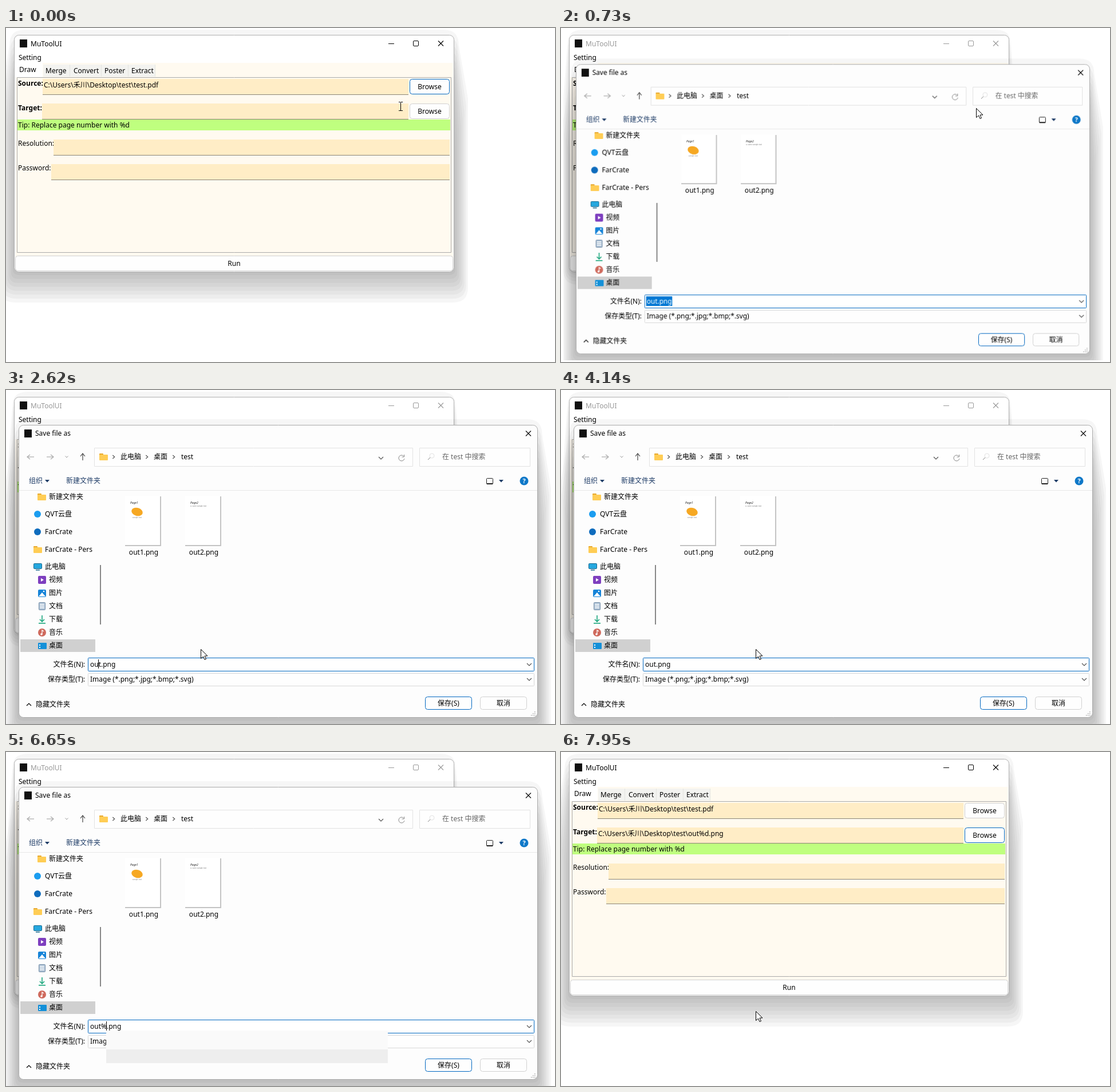
Recreate the animation shown at these times as an HTML page with a canvas. Size 959x584 px, loop 8000 ms.

```html
<!DOCTYPE html>
<html lang="zh-CN">
<head>
<meta charset="utf-8">
<style>
html, body { margin: 0; width: 100%; height: 100%; overflow: hidden; background: #fff; }
canvas { display: block; }
</style>
</head>
<body>
<canvas id="stage" width="959" height="584"></canvas>
<script>
const W = 959, H = 584, LOOP = 8000;
const stage = document.getElementById('stage').getContext('2d');
const layer = document.createElement('canvas');
layer.width = W;
layer.height = H;
const dialogCtx = layer.getContext('2d');
let g = stage;

const BLUE = '#0067c0', CREAM = '#fffaf0', FIELD = '#ffedc6';
const FAMILY = '"Noto Sans", "Noto Sans CJK SC", "Noto Sans CJK", sans-serif';
const clamp = v => Math.max(0, Math.min(1, v));

function text(s, x, y, color = '#000', align = 'left', style = '12px') {
  g.font = `${style} ${FAMILY}`;
  g.textAlign = align;
  g.fillStyle = color;
  g.fillText(s, x, y);
}
function box(x, y, w, h, fill, stroke, r = 0) {
  g.beginPath();
  const o = stroke ? .5 : 0;
  g.roundRect(x + o, y + o, w - 2 * o, h - 2 * o, r);
  if (fill) { g.fillStyle = fill; g.fill(); }
  if (stroke) { g.strokeStyle = stroke; g.lineWidth = 1; g.stroke(); }
}
function disc(x, y, r, fill) {
  g.beginPath();
  g.arc(x, y, r, 0, 7);
  g.fillStyle = fill;
  g.fill();
}
function path(points, stroke, fill, width = 1) {
  g.beginPath();
  for (let i = 0; i < points.length; i += 2) g.lineTo(points[i], points[i + 1]);
  if (fill) { g.closePath(); g.fillStyle = fill; g.fill(); }
  if (stroke) { g.strokeStyle = stroke; g.lineWidth = width; g.stroke(); }
}
const chevron = (x, y, dx, dy, color = '#555') =>
  path(dx ? [x - dx, y - 3, x + dx, y, x - dx, y + 3] : [x - 4, y - dy, x, y + dy, x + 4, y - dy], color, null, 1.2);
const triangle = (x, y, color) => path([x - 4, y - 2, x + 4, y - 2, x, y + 2.5], null, color);
function cross(x, y, color) {
  path([x - 4.5, y - 4.5, x + 4.5, y + 4.5], color, null, 1.1);
  path([x + 4.5, y - 4.5, x - 4.5, y + 4.5], color, null, 1.1);
}

// Stacked translucent bands; the inner ones start lower, so the top stays light
function shadow(x, y, w, h, spread, drop, bands) {
  g.fillStyle = 'rgba(0,0,0,.036)';
  for (let i = 0; i < bands; i++) {
    const k = 1 - i / bands;
    const l = x - spread * k, r = x + w + spread * k;
    const t = y - 10 + 12 * i, b = y + h + drop * k, taper = spread * .65 * k, c = 8 + 18 * k;
    g.beginPath();
    g.moveTo(l + taper + c, t);
    g.lineTo(r - taper - c, t);
    g.quadraticCurveTo(r - taper, t, r - taper, t + c);
    g.lineTo(r, t + 120);
    g.lineTo(r, b - c);
    g.quadraticCurveTo(r, b, r - c, b);
    g.lineTo(l + c, b);
    g.quadraticCurveTo(l, b, l, b - c);
    g.lineTo(l, t + 120);
    g.lineTo(l + taper, t + c);
    g.quadraticCurveTo(l + taper, t, l + taper + c, t);
    g.fill();
  }
}

function entry(x, y, w, value) {
  box(x, y, w, 27, FIELD);
  box(x, y + 27, w, 1, '#8a8578');
  text(value, x + 2, y + 15);
}
function button(x, y, w, h, label, active, hover) {
  box(x, y, w, h, hover ? '#cfe4f7' : '#fefefe', active ? BLUE : '#d0d0d0', 4);
  text(label, x + w / 2, y + h / 2 + 4, '#000', 'center');
}

function mainWindow(t, mouse) {
  const active = t < 570 || t >= 7720, clicked = t >= 480;
  const ink = active ? '#000' : '#999';
  if (active) shadow(15, 13, 767, 412, 25, 55, 8);
  else shadow(15, 13, 767, 412, 11, 24, 4);
  box(14, 12, 769, 415, '#fff', '#b0b0b0', 8);
  box(16, 61, 765, 364, CREAM, null, [0, 0, 7, 7]);
  box(24, 20, 13, 14, '#111');
  text('MuToolUI', 43, 32, ink);
  path([668, 27.5, 678, 27.5], ink);
  box(711, 22, 10, 10, null, ink, 1.5);
  cross(759.5, 27, ink);
  text('Setting', 22, 56);

  box(65, 64, 195, 21, '#f3f3f0');
  for (const x of [111, 166, 213, 260]) box(x, 64, 1, 21, '#e4e4e0');
  box(16, 61, 48, 25, '#fff');
  text('Draw', 23, 77);
  [['Merge', 69], ['Convert', 118], ['Poster', 172], ['Extract', 219]]
    .forEach(([label, x]) => text(label, x, 79));
  box(19, 86, 759, 307, CREAM, '#aaa');

  text('Source:', 21, 101, '#000', 'left', 'bold 12px');
  text('Target:', 21, 144, '#000', 'left', 'bold 12px');
  entry(64, 89, 639, 'C:\\Users\\禾川\\Desktop\\test\\test.pdf');
  entry(63, 132, 640, t >= 7830 ? 'C:\\Users\\禾川\\Desktop\\test\\out%d.png' : '');
  const hover = t < 760 && mouse.x > 705 && mouse.y > 132;
  button(705, 89, 70, 27, 'Browse', !clicked);
  button(705, 132, 70, 27, 'Browse', clicked || hover, hover);
  box(20, 160, 756, 19, '#bfff7f');
  text('Tip: Replace page number with %d', 21, 174);
  text('Resolution:', 21, 206);
  entry(83, 195, 692, '');
  text('Password:', 21, 249);
  entry(79, 238, 696, '');
  button(16, 398, 765, 27, 'Run');
}

function folder(x, y) {
  box(x, y - 6, 7, 5, '#e8a92e', null, 1);
  box(x, y - 4, 15, 10, '#ffcd55', null, 1);
}
const icons = {
  folder,
  cloud: (x, y) => disc(x + 7, y, 6, '#1b9df0'),
  drive: (x, y) => disc(x + 7, y, 6, '#0f6cbd'),
  monitor(x, y) {
    box(x, y - 6, 15, 10, '#26a8df', '#17668c', 1);
    box(x + 4, y + 5, 7, 1.5, '#17668c');
  },
  video(x, y) {
    box(x, y - 7, 14, 14, '#7e3fbf', null, 2);
    path([x + 5, y - 3, x + 10, y, x + 5, y + 3], null, '#fff');
  },
  image(x, y) {
    box(x, y - 6, 14, 13, '#1684d8', null, 2);
    path([x + 1, y + 6, x + 7, y - 1, x + 13, y + 6], null, '#fff');
    disc(x + 10, y - 3, 1.3, '#fff');
  },
  doc(x, y) {
    box(x + 1, y - 7, 12, 14, '#a9bed3', '#7890a8', 1);
    for (const d of [-4, -1, 2]) box(x + 3, y + d, 8, 1.5, '#fff');
  },
  down(x, y) {
    path([x + 7, y - 7, x + 7, y + 4], '#18a57b', null, 1.6);
    path([x + 3, y, x + 7, y + 4, x + 11, y], '#18a57b', null, 1.6);
    box(x + 1, y + 6, 12, 1.6, '#18a57b');
  },
  music(x, y) {
    disc(x + 7, y, 7, '#cf6a5d');
    path([x + 7, y + 3, x + 7, y - 4, x + 10, y - 2], '#fff', null, 1.3);
    disc(x + 6, y + 3, 1.8, '#fff');
  },
  desktop(x, y) {
    box(x, y - 5, 15, 11, '#1490d8', null, 1);
    box(x + 2, y - 2, 2, 2, '#fff');
    box(x + 2, y + 2, 2, 2, '#fff');
  }
};
const places = [
  ['folder', '新建文件夹', 55, 187], ['cloud', 'QVT云盘', 48, 217],
  ['drive', 'FarCrate', 48, 248], ['folder', 'FarCrate - Pers', 48, 279],
  ['monitor', '此电脑', 48, 309], ['video', '视频', 56, 332], ['image', '图片', 56, 355],
  ['doc', '文档', 56, 378], ['down', '下载', 56, 401], ['music', '音乐', 56, 424],
  ['desktop', '桌面', 56, 447]
];

function arrow(x, y, dx, dy, color) {
  path([x - 6 * dx, y - 6 * dy, x + 6 * dx, y + 6 * dy], color, null, 1.2);
  const bx = x + dx, by = y + dy;
  path([bx - 4 * dy, by + 4 * dx, x + 6 * dx, y + 6 * dy, bx + 4 * dy, by - 4 * dx], color, null, 1.2);
}

function thumbnail(x, n) {
  box(x, 185, 62, 87, '#fff');
  box(x + 61, 186, 2, 87, '#c4c4c4');
  box(x, 271, 63, 2, '#c4c4c4');
  text('Page' + n, x + 9, 199, '#222', 'left', 'italic 5px');
  if (n == 1) {
    g.beginPath();
    g.ellipse(x + 21, 213, 10, 7, .3, 0, 7);
    g.fillStyle = '#f6a823';
    g.fill();
    text('sample text', x + 21, 224, '#888', 'center', '3px');
  } else text('a. some sample text', x + 9, 204, '#777', 'left', '3px');
  text(`out${n}.png`, x + 32.5, 288, '#000', 'center');
}

function loadingPane() {
  const gray = '#888';
  text('名称', 191, 191, gray);
  text('修改日期', 442, 191, gray);
  text('类型', 579, 191, gray);
  text('大小', 696, 191, gray);
  for (const x of [436, 573, 689, 765]) box(x, 176, 1, 26, '#e5e5e5');
  chevron(311, 176, 0, -2, gray);
  text('正在处理...', 523, 226, gray);
}

function fileName(t) {
  const typed = t >= 7100 ? 'out%d' : t >= 5220 ? 'out%' : 'out';
  const selected = t < 2400;
  if (selected) box(146, 471, 46, 17, '#0078d4');
  text(typed + '.png', 147, 484, selected ? '#fff' : '#000');
  // The caret blink restarts at each key press
  const [start, x] = t >= 7100 ? [7100, 182] : t >= 5220 ? [5220, 175]
    : t >= 3610 ? [3610, 165] : [2490, 161];
  if (!selected && t < 7630 && Math.floor((t - start) / 530) % 2 <= 0) box(x, 471, 1, 16, '#000');
}

function dialogPane(t) {
  arrow(43, 117, -1, 0, '#aaa');
  arrow(77, 117, 1, 0, '#aaa');
  path([103.5, 115.5, 106, 118, 108.5, 115.5], '#999');
  arrow(134, 117, 0, -1, '#444');
  box(154, 101, 557, 33, '#fefefe', '#e2e2e2');
  folder(163, 117);
  [['此电脑', 200], ['桌面', 258], ['test', 306]].forEach(([s, x], i) => {
    text(s, x, 121);
    chevron([188, 246, 293][i], 117, 1.7, 0);
  });
  chevron(655, 119, 0, 2);
  g.beginPath();
  g.arc(691, 119, 5, .2, 5.5);
  g.strokeStyle = '#888';
  g.lineWidth = 1;
  g.stroke();
  path([695.5, 113, 695.5, 117, 691.5, 117], '#888');
  box(722, 101, 194, 33, '#fefefe', '#e2e2e2');
  g.beginPath();
  g.arc(744, 115, 4, 0, 7);
  g.stroke();
  path([741, 118, 737, 122], '#888');
  text('在 test 中搜索', 762, 121, '#666');

  text('组织', 40, 163, '#1d3b66');
  triangle(72, 159, '#1d3b66');
  text('新建文件夹', 105, 163, '#1d3b66');
  box(839, 154, 12, 11, null, '#222', 1);
  box(840, 163, 10, 2, '#222');
  triangle(865, 159, '#1d3b66');
  disc(905, 159, 7.5, '#0f78c8');
  text('?', 905, 163, '#fff', 'center', 'bold 11px');
  box(23, 175, 905, 1, '#e8e8e8');

  box(25, 436, 131, 22, t < 7720 ? '#d0d0d0' : '#d9d9d9');
  for (const [icon, label, x, y] of places) {
    icons[icon](x, y);
    text(label, x < 50 ? 68 : 75, y + 4);
  }
  thumbnail(208, 1);
  thumbnail(313, 2);

  text('文件名(N):', 138, 484, '#000', 'right');
  box(143, 468, 780, 24, '#fff', BLUE, 1);
  fileName(t);
  chevron(914, 480, 0, 2);
  text('保存类型(T):', 138, 510, '#000', 'right');
  box(143, 495, 780, 23, '#fefefe', '#d8d8d8', 1);
  text('Image (*.png;*.jpg;*.bmp;*.svg)', 147, 510);
  chevron(914, 506, 0, 2);
  if (t >= 6650) {
    if (t < 7010) box(175, 487, 492, 34, '#fafafa');
    box(175, 520, 492, 24, '#eee');
  }
  chevron(40, 550, 0, -2, '#000');
  text('隐藏文件夹', 52, 554);
  button(732, 536, 82, 23, '保存(S)', true);
  button(828, 536, 82, 23, '取消');
  for (let i = 0; i < 3; i++)
    for (let j = 0; j <= i; j++) box(923 - 3 * j, 562 + 3 * i, 1.5, 1.5, '#aaa');
}

function dialog(t) {
  const closing = clamp((t - 7830) / 110);
  const alpha = clamp((t - 570) / 60) * (1 - closing);
  if (!alpha) return;
  const opening = clamp((t - 595) / 225);
  const scale = 1 - .1 * (1 - opening) ** 2.5 - .1 * closing ** 2;

  g = dialogCtx;
  g.clearRect(0, 0, W, H);
  shadow(22, 61, 906, 511, 24, 50, 8);
  box(22, 61, 907, 512, '#fdfdfd', '#aaa', 8);
  const focused = t < 7720;
  if (focused) {
    box(32, 69, 13, 14, '#111');
    cross(912.5, 76, '#000');
  }
  text('Save file as', focused ? 51 : 30, 80);
  box(164, 306, 2, 104, '#888');
  if (t < 660) loadingPane();
  else dialogPane(t);

  // Zoom around a point slightly left of and above the dialog's centre
  const cx = 423, cy = 290;
  g = stage;
  g.save();
  g.globalAlpha = alpha;
  g.translate(cx, cy);
  g.scale(scale, scale);
  g.drawImage(layer, -cx, -cy);
  g.restore();
}

// Pointer stops: time, x, y
const stops = [
  [30, 689, 137], [360, 725, 140], [760, 725, 140], [850, 670, 158],
  [1630, 194, 478], [1820, 212, 460], [2300, 161, 479], [2470, 161, 479], [2620, 340, 453]
];
function pointer(t) {
  const i = stops.findIndex(s => s[0] > t);
  if (i <= 0) {
    const [, x, y] = i ? stops[stops.length - 1] : stops[0];
    return { x, y };
  }
  const [t0, x0, y0] = stops[i - 1], [t1, x1, y1] = stops[i];
  const p = (t - t0) / (t1 - t0), e = p * (2 - p);
  return { x: x0 + (x1 - x0) * e, y: y0 + (y1 - y0) * e };
}
function drawPointer(t, { x, y }) {
  if (t >= 5220 && t < 7630) return; // hidden while typing
  x = Math.round(x);
  y = Math.round(y);
  if (t < 570 ? x < 704 : y > 467) {
    box(x, y - 7, 1, 15, '#000');
    for (const d of [-8, 7]) {
      box(x - 3, y + d, 3, 1, '#000');
      box(x + 1, y + d, 3, 1, '#000');
    }
    return;
  }
  const shape = [0, 0, 0, 16, 4, 12.5, 6.5, 18, 9, 17, 6.5, 11.5, 11.5, 11.5];
  path([...shape, 0, 0].map((v, i) => v + (i % 2 ? y : x) + .5), '#000', '#fff');
}

function frame(now) {
  const t = now % LOOP, mouse = pointer(t);
  g = stage;
  g.fillStyle = '#fff';
  g.fillRect(0, 0, W, H);
  mainWindow(t, mouse);
  dialog(t);
  drawPointer(t, mouse);
  requestAnimationFrame(frame);
}
requestAnimationFrame(frame);
</script>
</body>
</html>
```
